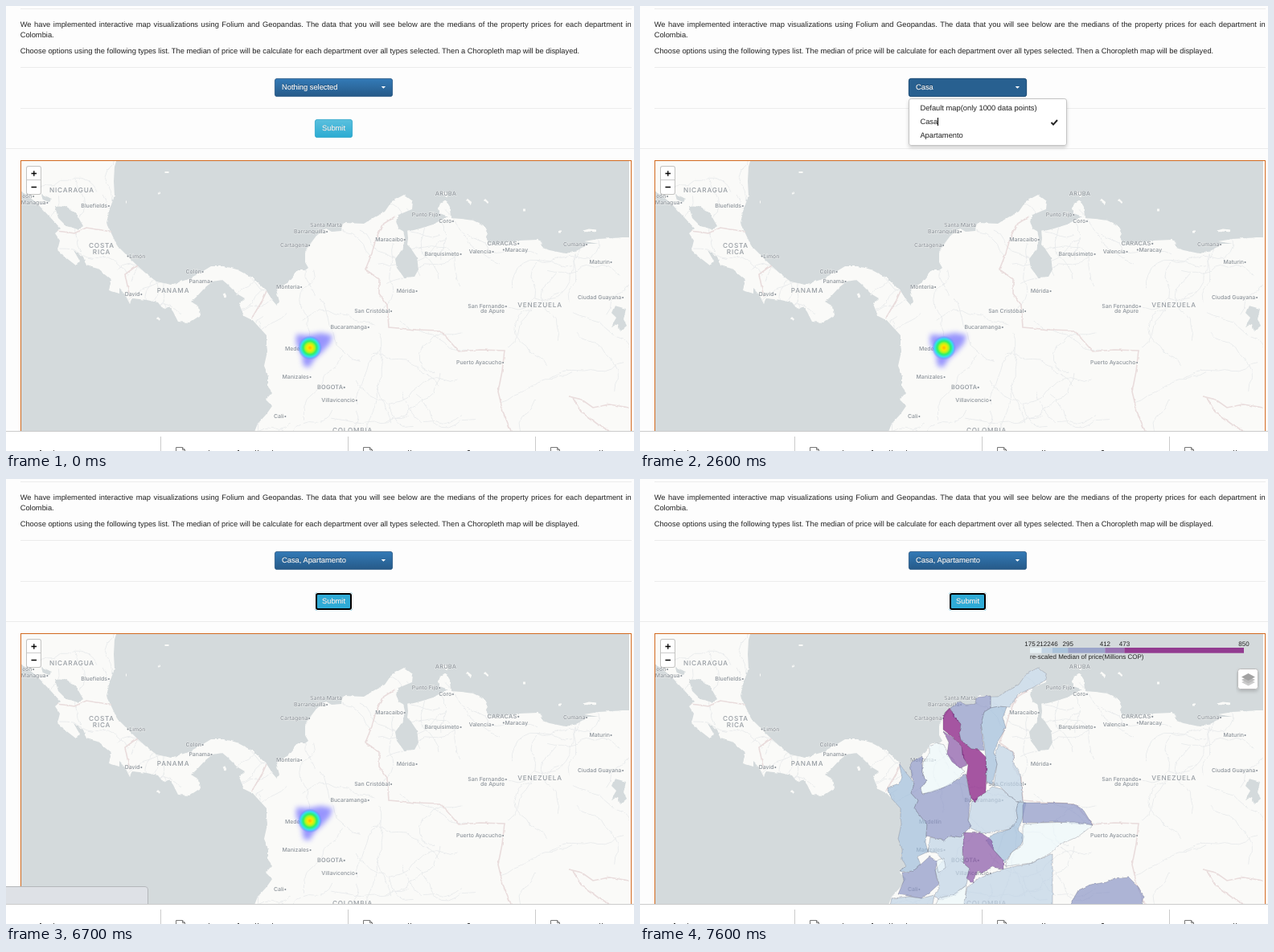
Write an HTML page that moves like this. It is 781x554 px and loops after 8000 ms.

```html
<!DOCTYPE html>
<html lang="en">
<head>
<meta charset="utf-8">
<title>Property price map</title>
<style>
html, body { margin: 0; width: 100%; height: 100%; overflow: hidden; background: #fdfdfd; }
svg { position: absolute; left: 0; top: 0; }
p, text { font-family: "Liberation Sans", Arial, sans-serif; font-size: 9.333px; text-rendering: geometricPrecision; }
p { position: absolute; left: 17.7px; width: 760px; margin: 0; line-height: 13.333px; color: #222; text-align: justify; }
.btn text { fill: #fff; stroke: #fff; stroke-width: .15px; text-shadow: 0 -.67px 0 rgba(0,0,0,.25); }
.menu text { fill: #222; }
.labels text { font: 500 6.9px Inter, "Open Sans", sans-serif; fill: #8d949b; text-anchor: middle; paint-order: stroke; stroke: #fafaf8; stroke-opacity: .7; stroke-width: 1px; }
.labels .city { font-size: 7.4px; letter-spacing: .2px; }
.labels .country { font-size: 8.2px; letter-spacing: .8px; fill: #979da3; }
.legend text { font-size: 8px; fill: #222; }
</style>
</head>
<body>
<p style="top:17px">We have implemented interactive map visualizations using Folium and Geopandas. The data that you will see below are the medians of the property prices for each department in Colombia.</p>
<p style="top:50.3px">Choose options using the following types list. The median of price will be calculate for each department over all types selected. Then a Choropleth map will be displayed.</p>

<svg width="781" height="554" viewBox="0 0 781 554">
<defs>
  <linearGradient id="blue" x2="0" y2="1"><stop stop-color="#337ab7"/><stop offset="1" stop-color="#265a88"/></linearGradient>
  <linearGradient id="cyan" x2="0" y2="1"><stop stop-color="#5bc0de"/><stop offset="1" stop-color="#2aabd2"/></linearGradient>
  <linearGradient id="row" x2="0" y2="1"><stop stop-color="#f5f5f5"/><stop offset="1" stop-color="#e8e8e8"/></linearGradient>
  <radialGradient id="heat">
    <stop stop-color="#ffb400"/><stop offset=".2" stop-color="#ffe600"/><stop offset=".38" stop-color="#b4f51e"/>
    <stop offset=".56" stop-color="#2cf06a"/><stop offset=".76" stop-color="#35e0f0"/><stop offset="1" stop-color="#5b7dff" stop-opacity="0"/>
  </radialGradient>
  <filter id="soft" x="-.3" y="-.3" width="1.6" height="1.6"><feGaussianBlur stdDeviation="3"/></filter>
  <filter id="shade" x="-.1" y="-.2" width="1.2" height="1.5"><feDropShadow dx="0" dy="2.5" stdDeviation="2" flood-opacity=".18"/></filter>
  <filter id="coast" filterUnits="userSpaceOnUse" x="0" y="170" width="800" height="380" color-interpolation-filters="sRGB">
    <feTurbulence type="fractalNoise" baseFrequency=".14" numOctaves="3" seed="4"/>
    <feDisplacementMap in="SourceGraphic" scale="3" xChannelSelector="R" yChannelSelector="G"/>
  </filter>
  <clipPath id="view"><rect x="19" y="193" width="756" height="336"/></clipPath>
  <clipPath id="ground"><use href="#west"/><use href="#mid"/><use href="#east"/></clipPath>
</defs>

<path d="M18 3.5H778M18 76.5H778M18 127.5H778M0 177.5H781" stroke="#ececec"/>

<g class="btn">
  <rect x="334.4" y="90.4" width="146.2" height="22.2" rx="2.6" fill="url(#blue)" stroke="#245580" stroke-width=".8"/>
  <rect data-on="500-900 1600-3600" x="334.4" y="90.4" width="146.2" height="22.2" rx="2.6" fill="#286090" stroke="#204d74" stroke-width=".8"/>
  <g data-on="900-1600">
    <rect x="334" y="90" width="147" height="23" rx="4" fill="#fdfdfd"/>
    <rect x="336" y="92" width="143" height="19" rx="2" fill="#204d74" stroke="#000" stroke-width="2"/>
  </g>
  <text x="343" y="104" data-on="0-1600">Nothing selected</text>
  <text x="343" y="104" data-on="1600-2900">Casa</text>
  <text x="343" y="104" data-on="2900-8000">Casa, Apartamento</text>
  <path d="M466.7 100h5.4l-2.7 2.8z" fill="#fff"/>

  <rect x="384.4" y="141.4" width="46.2" height="22.2" rx="2.6" fill="url(#cyan)" stroke="#28a4c9" stroke-width=".8"/>
  <rect data-on="400-500 4000-4200" x="384.4" y="141.4" width="46.2" height="22.2" rx="2.6" fill="#2aabd2" stroke="#28a4c9" stroke-width=".8"/>
  <rect data-on="4200-4300" x="384.4" y="141.4" width="46.2" height="22.2" rx="2.6" fill="#269abc" stroke="#1b6d85" stroke-width=".8"/>
  <g data-on="4300-8000">
    <rect x="384" y="141" width="47" height="23" rx="4" fill="#fdfdfd"/>
    <rect x="386" y="143" width="43" height="19" rx="2" fill="#2fabd6" stroke="#000" stroke-width="2"/>
  </g>
  <text x="393" y="155.3">Submit</text>
</g>

<g class="menu" data-on="900-3600">
  <rect x="334.5" y="115.5" width="196" height="58" rx="2.6" fill="#fff" stroke="#c4c4c4" filter="url(#shade)"/>
  <g fill="url(#row)">
    <rect data-on="1200-1400" x="335" y="118.3" width="195" height="17.4"/>
    <rect data-on="1400-1900" x="335" y="135.7" width="195" height="17.3"/>
    <rect data-on="2700-3100" x="335" y="153" width="195" height="17.3"/>
  </g>
  <text x="348.4" y="130">Default map(only 1000 data points)</text>
  <text x="348.4" y="147">Casa</text>
  <text x="348.4" y="164">Apartamento</text>
  <g fill="none" stroke="#222" stroke-width="2">
    <path data-on="1700-3600" d="M511.5 145l2.5 2.6 5-5.6"/>
    <path data-on="3000-3600" d="M511.5 162l2.5 2.6 5-5.6"/>
  </g>
  <path data-on="2100-2700" d="M370.5 139v10" stroke="#000"/>
  <path data-on="3400-3600" d="M401.5 156v10" stroke="#000"/>
</g>

<rect x="18.5" y="192.5" width="759" height="345" fill="#fff" stroke="#d2691e"/>
<g clip-path="url(#view)" data-on="0-7000 7400-8000">
  <rect x="19" y="193" width="756" height="336" fill="#d4dadc"/>
  <g filter="url(#coast)">
    <g fill="#fafaf8">
      <polygon id="west" points="0,180 141,180 135,200 134,218 135,237 129,252 125,270 131,283 138,298 150,310 163,323 173,332 187,343 205,347 227,340 245,330 255,324 272,324 287,328 306,338 324,355 331,366 312,392 304,390 296,386 290,371 297,364 287,358 275,346 269,341 257,343 248,350 236,363 230,368 240,374 242,385 228,394 214,393 208,381 203,374 196,378 189,369 175,366 157,364 154,371 148,359 141,352 141,358 128,354 131,341 114,327 100,323 96,312 84,304 92,318 87,323 78,316 64,304 67,292 61,283 68,277 53,261 38,245 23,233 0,220"/>
      <polygon id="mid" points="306,338 324,355 331,366 337,373 340,368 336,353 351,344 363,329 372,329 376,326 372,319 372,306 377,298 386,286 398,277 405,281 417,280 418,272 421,270 445,271 458,263 471,256 480,243 495,235 506,243 505,253 488,260 485,268 488,277 497,282 505,300 505,540 305,540 313,520 324,508 331,498 323,490 331,481 326,474 326,460 321,448 325,430 324,420 324,410 313,398 304,388"/>
      <polygon id="east" points="497,281 503,280 515,277 531,272 540,267 550,262 539,258 537,252 541,246 547,242 552,250 553,264 566,265 581,267 594,273 599,283 597,288 600,295 607,296 625,294 638,292 661,291 666,293 667,301 676,304 695,308 707,306 719,300 722,296 737,296 719,293 737,290 768,288 790,288 790,540 500,540 500,300"/>
    </g>
    <path d="M543 232l6 4M573 241l6 5M595 241l4 4M718 281l7-2 9 1M687 281h4M643 254h3M200 206v2M190 232l1 2M149 244h1M188 388l3 3M271 358l2 4" fill="none" stroke="#fafaf8" stroke-width="3"/>
    <path id="roads" clip-path="url(#ground)" fill="none" stroke="#eaeced" stroke-width="1"/>
    <path d="M484 262L468 272 460 290 455 308 447 328 464 340 464 358 474 372 476 400 510 403 540 404 563 430 590 428 620 429 617 455 612 480 618 505 628 529M700 486L716 490 730 500 750 496 775 500M705 488L715 505 735 520 750 529M64 280L85 283 100 276 131 281M163 323L148 334 154 362M324 355L318 368 306 388" fill="none" stroke="#e9dcdc" stroke-width="1.6"/>
    <g fill="#d4dadc">
      <polygon points="61,250 74,249 87,258 96,274 90,278 75,274 65,264"/>
      <polygon points="44,234 57,240 53,244 46,241"/>
      <polygon points="494,279 499,279 500,289 499,297 503,301 511,313 513,328 508,337 495,338 486,326 484,315 494,301 496,288"/>
      <polygon points="757,373 771,377 768,390 772,398 764,405 761,396 752,400 759,388 753,382"/>
    </g>
  </g>
  <g class="labels" id="labels"></g>

  <g data-on="0-7000">
    <polygon fill="#726eff" opacity=".72" filter="url(#soft)" points="361,409 376,410 392,407 406,410 403,420 393,431 384,439 377,450 370,448 368,434 361,420"/>
    <circle cx="378" cy="425.5" r="15" fill="url(#heat)"/>
  </g>

  <g data-on="7600-8000" filter="url(#coast)" fill-opacity=".7" stroke="#445" stroke-opacity=".3" stroke-width=".8">
    <g fill="#bfd3e6">
      <polygon points="436,271 445,271 458,263 471,256 480,243 495,235 506,243 505,250 488,260 470,268 460,284 446,283 436,285"/>
      <polygon points="446,330 464,340 465,355 473,367 476,402 470,402 460,395 447,382 440,382 444,355 441,345"/>
      <polygon points="430,390 438,383 450,386 460,395 470,402 468,412 470,425 460,436 436,440 425,441 412,435 408,425 413,402 420,396"/>
      <polygon points="440,490 454,485 488,478 513,466 513,540 400,540 407,508 420,498"/>
      <polygon points="361,446 378,450 386,444 398,446 404,440 401,466 402,478 410,485 406,505 392,518 372,524 366,518 373,510 367,487 377,475 368,465 358,465"/>
      <polygon points="313,522 335,520 350,522 366,518 362,540 309,540"/>
    </g>
    <g fill="#9ebcda">
      <polygon points="322,353 331,366 337,373 341,380 337,391 345,400 341,410 357,430 355,452 358,464 345,470 349,480 340,488 323,489 331,481 326,474 326,460 321,448 325,430 324,420 324,410 313,398 308,385 322,380 326,372"/>
      <polygon points="436,285 446,283 456,284 451,297 455,310 446,325 440,340 444,355 438,380 431,378 430,346 427,322 424,305 428,290"/>
      <polygon points="470,402 480,403 475,425 470,436 478,445 474,455 462,465 454,478 438,460 430,450 440,442 460,436 470,425 468,412"/>
    </g>
    <g fill="#8c96c6">
      <polygon points="386,285 398,277 405,281 417,280 418,272 436,270 436,285 428,290 424,305 428,338 412,336 399,325 397,316 399,305 389,295"/>
      <polygon points="336,353 351,345 351,365 356,376 349,385 351,392 377,384 398,372 405,367 411,397 408,425 412,432 398,446 386,444 378,450 356,444 357,430 341,410 345,400 337,391 341,380 338,370"/>
      <polygon points="476,403 510,403 540,404 552,413 563,431 520,427 476,428"/>
      <polygon points="326,490 340,488 349,480 360,470 370,476 367,487 371,505 360,515 350,522 321,517 328,500"/>
      <polygon points="536,540 537,526 545,512 560,505 580,502 590,497 607,495 620,508 627,520 622,540"/>
    </g>
    <g fill="#edf8fb">
      <polygon points="351,365 352,352 360,342 360,333 369,329 378,331 383,342 396,358 404,364 388,380 362,390 351,392 349,385 356,376"/>
      <polygon points="476,430 500,428 540,427 563,431 545,445 522,455 510,466 488,478 454,482 462,465 476,455"/>
      <polygon points="368,475 378,472 380,484 371,490"/>
      <polygon points="372,522 392,516 406,506 402,540 362,540"/>
    </g>
    <g fill="#8856a7">
      <polygon points="377,314 383,318 391,323 400,333 402,345 407,356 398,360 388,352 382,342 384,328"/>
      <polygon points="404,440 425,441 438,450 440,462 452,475 452,486 438,483 426,490 419,487 414,503 406,497 410,485 402,478 401,460"/>
    </g>
    <polygon fill="#810f7c" points="377,298 379,291 385,285 392,297 399,305 397,316 399,325 412,336 421,337 430,346 431,360 430,390 420,396 418,403 411,397 406,370 408,356 401,345 400,333 391,323 377,312"/>
  </g>

  <g class="legend" id="legend" data-on="7500-8000">
    <text x="485" y="224.4">re-scaled Median of price(Millions COP)</text>
  </g>
  <g data-on="7500-8000">
    <rect x="743.5" y="236.5" width="25" height="25" rx="3" fill="#fff" stroke="#bbb" filter="url(#shade)"/>
    <path d="M748 253l8.500-4 8.500 4-8.500 4.500z" fill="#ccc"/>
    <path d="M748 250l8.500-4 8.500 4-8.500 4.500z" fill="#bbb"/>
    <path d="M748 246.500l8.500-4.500 8.500 4.500-8.500 4.500z" fill="#a2a2a2"/>
  </g>

  <rect x="25" y="199" width="19" height="36" rx="3" fill="#000" fill-opacity=".22"/>
  <rect x="26" y="200" width="17" height="34" rx="2" fill="#fff"/>
  <path d="M26 216.500h17" stroke="#ccc"/>
  <path d="M31.500 208.500h6.500M34.800 205.200v6.500M31.500 225.500h6.500" stroke="#000" stroke-width="1.3"/>
</g>

<g data-on="6700-7400">
  <path d="M0 507H173q4 0 4 4V530H0z" fill="#dee1e6"/>
  <path data-on="6700-7000" d="M0 507.500H173q3.500 0 3.500 3.500V529" fill="none" stroke="#b4b7ba"/>
</g>

<rect y="529" width="781" height="25" fill="#fff"/>
<path d="M0 529.500H781M192.500 536V554M425.500 536V554M658.500 536V554" stroke="#cbcbcb"/>
<path d="M211.500 554v-4.500h8l3 3v1.500M219.500 549.500v3h3M444.500 554v-4.500h8l3 3v1.500M452.500 549.500v3h3M677.500 554v-4.500h8l3 3v1.500M685.500 549.500v3h3" fill="none" stroke="#777"/>
<path d="M42 553.500h2M59 553.500h1M252 553.500h1M288 553.500h2M310 553.500h1M313 553.500h1M331 553.500h1M500 553.500h1M503 553.500h1M574 553.500h3M738 553.500h1M741 553.500h1" stroke="#444"/>
</svg>

<script>
const LOOP = 8000;
const byId = id => document.getElementById(id);

function add(parent, tag, attrs, text = '') {
  const el = document.createElementNS('http://www.w3.org/2000/svg', tag);
  for (const k in attrs) el.setAttribute(k, attrs[k]);
  el.textContent = text;
  parent.append(el);
}

// Place names: text, centre x, centre y
const places = {
  country: 'NICARAGUA 82 229|COSTA 119 298|RICA 119 306|PANAMA 208 354|VENEZUELA 664 372|COLOMBIA 431 528',
  city: 'CARACAS• 619 295|BOGOTA• 405 474|ARUBA 547 233',
  town: 'eón• 28 236|Managua• 36 244|Bluefields• 111.5 248|•Limón 161.5 311|Colón• 235 330|Panama• 242.5 342|David• 159 358|' +
    'Punto Fijo• 523 259|Coro• 548 267|Santa Marta 398 272|Barranquilla• 379.5 280|Cartagena• 360 297|Maracaibo• 478.5 290|' +
    'Barquisimeto• 544 308|Valencia• 591.5 305|•Maracay 633 303|Cumana• 708.5 296|Maturin• 740 318|Mérida• 499 354|' +
    'Monteria• 352.5 349|San Cristóbal• 457 379|San Fernando• 599 373|de Apure 605 379|Ciudad Guayana• 740 362|' +
    'Bucaramanga• 428 399|Medellín 361 426|Puerto Ayacucho• 590 443|Manizales• 362 461|Villavicencio• 415 490|Cali• 341 510'
};
for (const kind in places)
  for (const item of places[kind].split('|')) {
    const [, name, x, y] = item.match(/(.+) (\S+) (\S+)/);
    add(byId('labels'), 'text', { class: kind, x, y: +y + 2.6 }, name);
  }

// Faint roads: seeded random walks, clipped to the land
let seed = 11;
const rand = () => (seed = seed * 16807 % 2147483647) / 2147483647;
let roads = '';
for (let i = 0; i < 95; i++) {
  let x = 19 + rand() * 756, y = 193 + rand() * 336, a = rand() * 6.3;
  roads += `M${x} ${y}`;
  for (let j = 0; j < 11; j++) {
    a += (rand() - .5) * 1.3;
    roads += `l${Math.cos(a) * 9} ${Math.sin(a) * 9}`;
  }
}
byId('roads').setAttribute('d', roads);

// Legend scale
const stops = [175, 212, 246, 295, 412, 473, 850];
const shades = ['#edf8fb', '#bfd3e6', '#9ebcda', '#8c96c6', '#8856a7', '#810f7c'];
const scaleX = v => 485 + (v - 175) * 266 / 675;
stops.forEach((v, i) => {
  const x = scaleX(v);
  if (shades[i])
    add(byId('legend'), 'rect', { x, y: 210, width: scaleX(stops[i + 1]) - x, height: 6.7, fill: shades[i], opacity: .78 });
  add(byId('legend'), 'text', { x, y: 207.6, 'text-anchor': 'middle' }, v);
});

// Each timed element is shown during its own spans
const timed = [...document.querySelectorAll('[data-on]')].map(el => ({
  el, spans: el.dataset.on.split(' ').map(s => s.split('-').map(Number))
}));
const start = performance.now();
function draw(now) {
  const t = Math.max(0, now - start) % LOOP;
  for (const { el, spans } of timed)
    el.style.display = spans.some(([from, to]) => t >= from && t < to) ? '' : 'none';
  requestAnimationFrame(draw);
}
draw(start);
</script>
</body>
</html>
```
